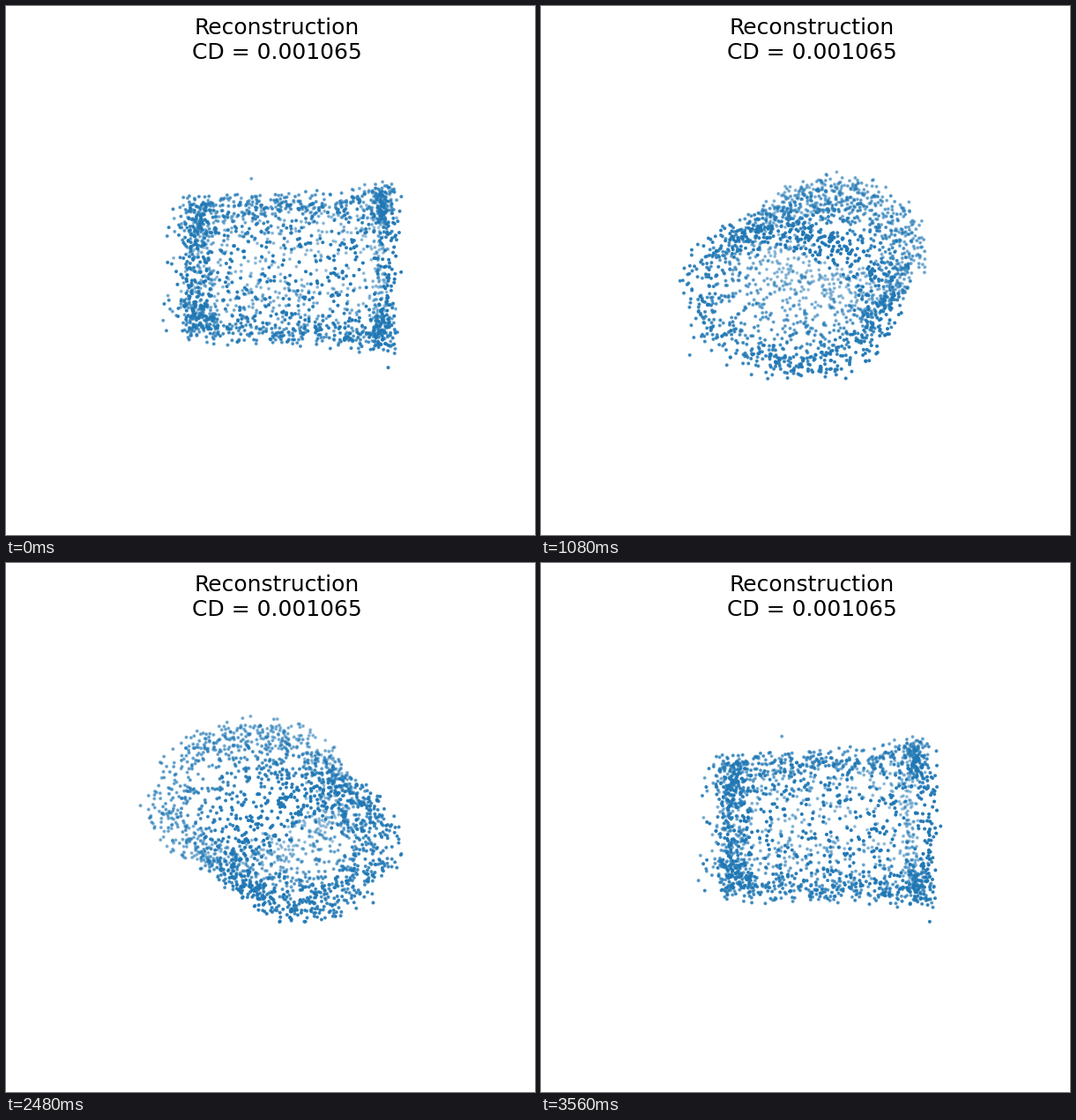
Recreate the animation shown at these times as a matplotlib script. Size 600 px wide and 600 px high, loop 3600 ms.

```python
import numpy as np
import matplotlib.pyplot as plt
from matplotlib.animation import FuncAnimation

SIZE, DPI = 600, 100
FRAMES, INTERVAL = 90, 40
CENTER = (313.7, 296.8)
EYE = 2500
ELEV = np.radians(20)
BLUE = (0x1f / 255, 0x77 / 255, 0xb4 / 255)


def make_cloud(n=2048, seed=4):
    """Thick-walled tube along u, wider at +u, with an annular face at each end."""
    rng = np.random.default_rng(seed)
    right, left = int(n * .19), int(n * .19)
    body = n - right - left
    u = np.concatenate([
        rng.normal(114, 7, right),
        rng.normal(-97, 12, left),
        rng.uniform(-106, 116, body),
    ])
    r = np.concatenate([
        rng.uniform(.66, 1, right),
        rng.uniform(.46, 1, left),
        rng.uniform(.78, 1, body),
    ]) + rng.normal(0, .035, n)
    t = rng.uniform(0, 2 * np.pi, n)
    a = t + .1 * np.sin(2 * t)           # more points on top and bottom
    s = u / 115
    r *= .97 + .03 * s ** 2
    w = (111 + 12 * s) * r * np.cos(a)
    z = (85 + 5 * s) * r * np.sin(a)
    strays = [(116, 112, -76), (-126, 40, 62), (-36, -75, 82), (-130, 55, -55)]
    return np.vstack([np.column_stack([u, w, z]), strays])


def project(cloud, turn):
    u, w, z = cloud.T
    x = u * np.cos(turn) - w * np.sin(turn)
    near = u * np.sin(turn) + w * np.cos(turn)
    up = z * np.cos(ELEV) - near * np.sin(ELEV)
    depth = near * np.cos(ELEV) + z * np.sin(ELEV)
    zoom = EYE / (EYE - depth)
    return CENTER[0] + x * zoom, CENTER[1] - up * zoom, depth


cloud = make_cloud()
fig = plt.figure(figsize=(SIZE / DPI, SIZE / DPI), dpi=DPI, facecolor="white")
ax = fig.add_axes([0, 0, 1, 1])
ax.set(xlim=(0, SIZE), ylim=(SIZE, 0))
ax.axis("off")
ax.text(307.5, 59.5, "Reconstruction\nCD = 0.001065", fontsize=18,
        family="DejaVu Sans", ha="center", va="baseline")
dots = ax.scatter(np.zeros(len(cloud)), np.zeros(len(cloud)), s=2, linewidths=1.5)


def draw(i):
    x, y, depth = project(cloud, 2 * np.pi * i / FRAMES)
    order = np.argsort(depth)            # far dots first
    shade = (depth - depth.min()) / np.ptp(depth)
    rgba = np.empty((len(cloud), 4))
    rgba[:, :3] = BLUE
    rgba[:, 3] = .3 + .7 * shade[order]
    dots.set_offsets(np.column_stack([x, y])[order])
    dots.set_facecolors(rgba)
    dots.set_edgecolors(rgba)
    return dots,


anim = FuncAnimation(fig, draw, frames=FRAMES, interval=INTERVAL,
                     repeat=True, repeat_delay=0)
plt.show()
```
